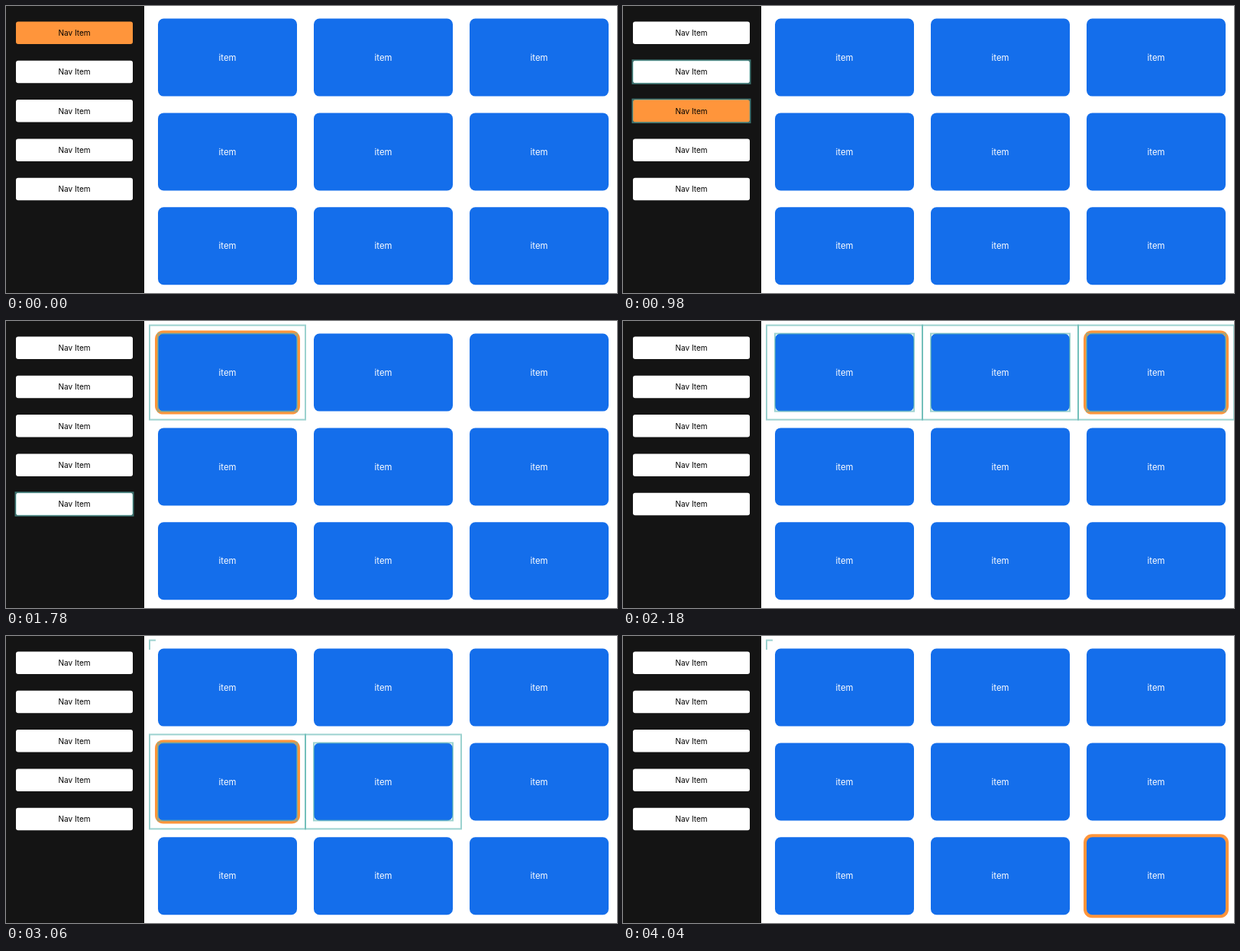
Animation of 800x377 px, one loop 4080 ms. Source, as an HTML page with a canvas:

```html
<!DOCTYPE html>
<html lang="en">
<head>
<meta charset="utf-8">
<title>Keyboard focus and repaint outlines</title>
<style>
  html, body { margin: 0; width: 100%; height: 100%; overflow: hidden; background: #fff; }
  canvas { display: block; }
</style>
</head>
<body>
<canvas id="stage" width="800" height="377"></canvas>
<script>
const ctx = document.getElementById('stage').getContext('2d');
const LOOP = 4080, FLASH = 230, FADE = 40;
const ORANGE = '#ff953b', BLUE = '#146eeb', TEAL = '#5ab4af';

// Nav buttons are 0-4, grid items 5-13.
const boxes = [];
for (let i = 0; i < 5; i++) boxes.push({ x: 13, y: 20.5 + 51.3 * i, w: 153, h: 29.5, nav: true });
for (let i = 0; i < 9; i++)
  boxes.push({ x: 199 + 204 * (i % 3), y: 16.6 + 123.8 * Math.floor(i / 3), w: 182, h: 102 });

// Focus walks down the nav, then snakes through the grid.
const order = [0, 1, 2, 3, 4, 5, 6, 7, 10, 9, 8, 11, 12, 13];
const starts = [0, 600, 840, 1090, 1300, 1700, 2000, 2160, 2460, 2700, 2940, 3170, 3390, 3540];
const TRACE_FROM = 2210, TRACE_CUT = 2990;

function flashAlpha(i, t) {
  let alpha = 0;
  for (let k = 1; k < order.length; k++) {
    const age = t - starts[k];
    if (age < 0 || (order[k] !== i && order[k - 1] !== i)) continue;
    alpha = Math.max(alpha, Math.min(1, (FLASH - age) / FADE));
  }
  return alpha;
}

function fillRound(x, y, w, h, r, color) {
  ctx.fillStyle = color;
  ctx.beginPath();
  ctx.roundRect(x, y, w, h, r);
  ctx.fill();
}

function label(text, b, size, color) {
  ctx.font = `${size}px Inter, Roboto, sans-serif`;
  ctx.fillStyle = color;
  ctx.fillText(text, b.x + b.w / 2, b.y + b.h / 2 + size * 0.37);
}

function drawBox(b, focused) {
  if (b.nav) {
    fillRound(b.x, b.y, b.w, b.h, 3, focused ? ORANGE : '#fff');
    label('Nav Item', b, 10, '#000');
    return;
  }
  if (focused) fillRound(b.x - 4, b.y - 4, b.w + 8, b.h + 8, 11, ORANGE);
  fillRound(b.x, b.y, b.w, b.h, 7.5, BLUE);
  label('item', b, 11.3, '#fff');
}

function outline(b, grow, alpha) {
  ctx.globalAlpha = 0.6 * alpha;
  ctx.strokeStyle = TEAL;
  ctx.lineWidth = 2;
  ctx.strokeRect(b.x - grow, b.y - grow, b.w + 2 * grow, b.h + 2 * grow);
  ctx.globalAlpha = 1;
}

// A corner of the first cell's outline lingers after its flash.
function drawTrace(t) {
  if (t < TRACE_FROM) return;
  ctx.save();
  ctx.beginPath();
  ctx.rect(186, 4, 10, t < TRACE_CUT ? 127 : 14);
  ctx.clip();
  outline(boxes[5], 11, 1);
  ctx.restore();
}

function draw(t) {
  ctx.fillStyle = '#fff';
  ctx.fillRect(0, 0, 800, 377);
  ctx.fillStyle = '#141414';
  ctx.fillRect(0, 0, 181, 377);
  ctx.textAlign = 'center';

  const focus = order[starts.findLastIndex(s => t >= s)];
  boxes.forEach((b, i) => drawBox(b, i === focus));
  boxes.forEach((b, i) => {
    const alpha = flashAlpha(i, t);
    if (alpha <= 0) return;
    outline(b, b.nav ? 0.5 : 0, alpha);
    if (!b.nav) outline(b, 11, alpha);
  });
  drawTrace(t);
}

const begin = performance.now();
function tick() {
  draw((performance.now() - begin) % LOOP);
  requestAnimationFrame(tick);
}
tick();
</script>
</body>
</html>
```
